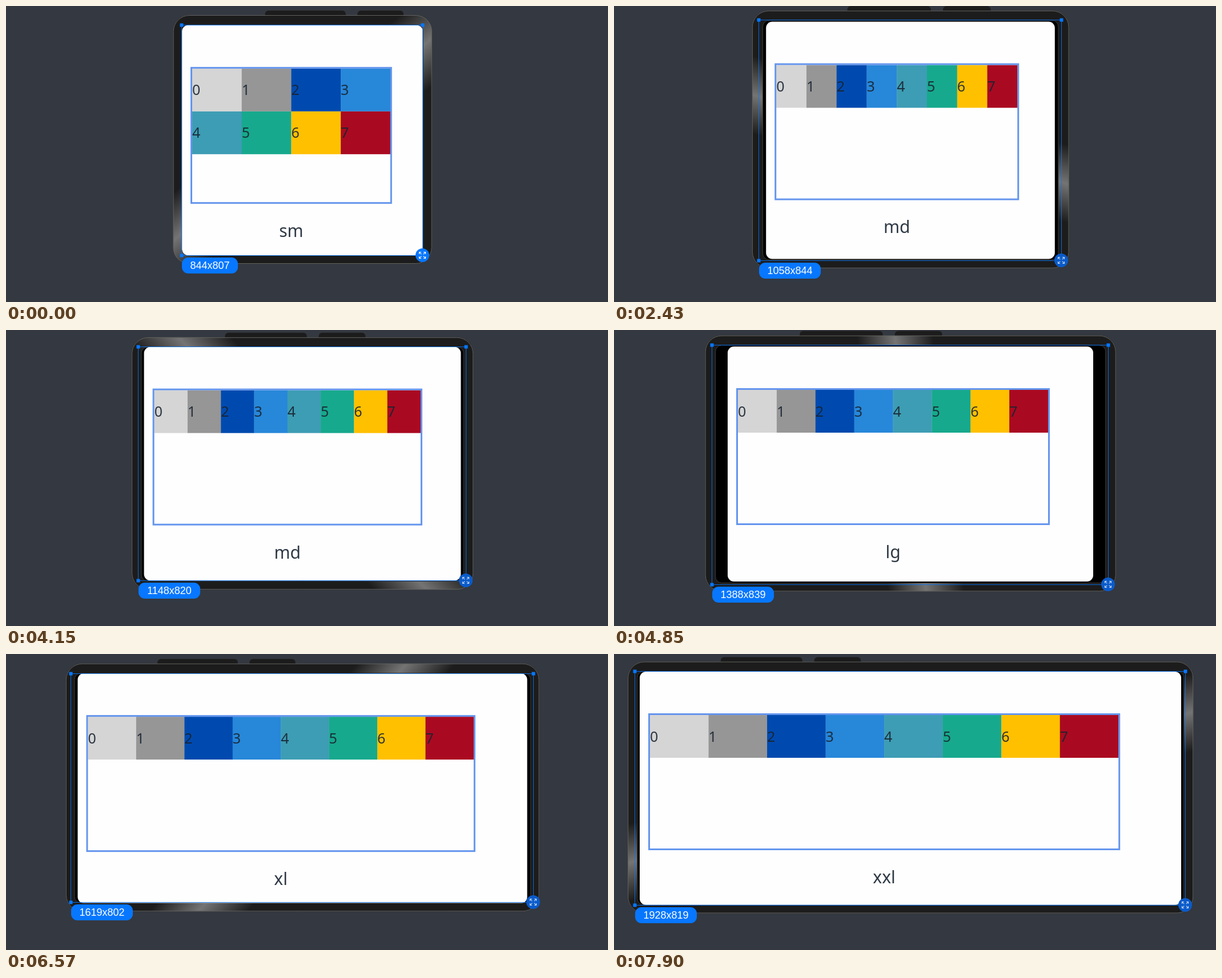
An HTML page with a canvas for the animation above (8000 ms loop, 1054 px wide and 519 px high).

```html
<!DOCTYPE html>
<html lang="en">
<head>
<meta charset="utf-8">
<title>Responsive grid</title>
<style>
html, body { margin: 0; width: 100%; height: 100%; overflow: hidden; background: #343840; }
canvas { display: block; }
</style>
</head>
<body>
<canvas id="stage" width="1054" height="519"></canvas>
<script>
const ctx = document.getElementById('stage').getContext('2d');
const LOOP = 8000, START = 1400, STEP = 101.4, PRESS = 1010;
const BLUE = '#0777ff', BODY = '#1c1c1c';
const CELLS = ['#d5d5d5', '#969696', '#004aaf', '#2787d9', '#3d9db4', '#17a98d', '#ffc000', '#aa0a21'];

// Drag path: step, width, height, vertical centre
const DRAG = [
  [-1, 844, 807, 235.6], [3, 864, 807, 235], [4, 886, 809, 235.6], [5, 900, 815, 236],
  [6, 964, 820, 235.8], [11, 1082, 850, 235], [12, 1087, 853, 234.4], [17, 1087, 853, 234.2],
  [18, 1080, 827, 234], [23, 1080, 827, 234], [24, 1090, 819, 234.4], [31, 1226, 821, 235],
  [32, 1280, 824, 235], [33, 1366, 832, 236], [34, 1388, 839, 236.6], [39, 1440, 836, 236],
  [41, 1456, 834, 235.6], [43, 1468, 807, 235.7], [44, 1494, 803, 235.6], [45, 1512, 807, 235.6],
  [48, 1574, 806, 235.6], [55, 1732, 791, 234.8], [56, 1774, 791, 236], [57, 1808, 803, 237],
  [62, 1896, 818, 235.5], [63, 1914, 817, 235.5], [64, 1928, 819, 235.6]
];
// Glint angle: step, degrees
const GLINT = [[-1, 218], [5, 205], [11, 156], [23, 156], [34, 97], [45, 68], [57, 25], [64, 15]];

function at(keys, s) {
  if (s <= keys[0][0]) return keys[0].slice(1);
  for (let i = 1; i < keys.length; i++) {
    const a = keys[i - 1], b = keys[i];
    if (s <= b[0]) {
      const f = (s - a[0]) / (b[0] - a[0]);
      return a.slice(1).map((v, j) => v + (b[j + 1] - v) * f);
    }
  }
  return keys[keys.length - 1].slice(1);
}

function area(s) {
  const [W, H, cy] = at(DRAG, s);
  return { W, H, x: 519 - W / 4, y: cy - H / 4, w: W / 2, h: H / 2 };
}

function round(x, y, w, h, r) {
  ctx.beginPath();
  ctx.roundRect(x, y, w, h, r);
}

function fillRound(color, ...box) {
  ctx.fillStyle = color;
  round(...box);
  ctx.fill();
}

function text(str, x, y, font, color, align = 'left') {
  ctx.font = font;
  ctx.fillStyle = color;
  ctx.textAlign = align;
  ctx.fillText(str, x, y);
}

function drawFrame(box, deg) {
  const m = 31 + (box.H - 807) * 0.2;
  const w = box.w + m, h = box.h + 32.5;
  const cx = 519.2, cy = 234, x = cx - w / 2, y = cy - h / 2;

  const bx = x + h * 0.369;
  fillRound(BODY, bx, y - 8, h * 0.324, 10, [6, 6, 0, 0]);
  fillRound(BODY, bx + h * 0.371, y - 8, h * 0.185, 10, [6, 6, 0, 0]);

  const a = deg * Math.PI / 180, nx = Math.sin(a) * 66, ny = Math.cos(a) * 66;
  const metal = ctx.createLinearGradient(cx - nx, cy - ny, cx + nx, cy + ny);
  metal.addColorStop(0, BODY);
  metal.addColorStop(0.5, '#747474');
  metal.addColorStop(1, BODY);
  fillRound(metal, x, y, w, h, 28);
  ctx.lineWidth = 1;
  ctx.strokeStyle = '#62625f';
  round(x + 0.5, y + 0.5, w - 1, h - 1, 28);
  ctx.stroke();

  const panel = [x + m / 2, y + 17, w - m, h - 31.8, 11];
  fillRound('#000', ...panel);
  ctx.strokeStyle = '#3a3a3a';
  ctx.stroke();
  return panel;
}

function drawScreen(box, panel) {
  ctx.save();
  round(...panel);
  ctx.clip();
  fillRound('#fefefe', box.x, box.y, box.w, box.h, 11);

  const gx = box.x + 15, gy = box.y + 73, gw = (box.w - 30) * 0.9;
  const cols = box.w < 450 ? 4 : 8, cw = (gw - 6) / cols;
  CELLS.forEach((color, i) => {
    const x = gx + 3 + (i % cols) * cw, y = gy + 3 + Math.floor(i / cols) * 75;
    ctx.fillStyle = color;
    ctx.fillRect(x, y, cw + 0.3, 75);
    text(i, x, y + 46.5, '25px "Noto Sans", sans-serif', 'rgba(24,36,49,.9)');
  });
  ctx.strokeStyle = '#6495ed';
  ctx.lineWidth = 3;
  ctx.strokeRect(gx + 1.5, gy + 1.5, gw - 3, 237);

  const size = ['sm', 'md', 'lg', 'xl', 'xxl'][[450, 600, 750, 900].filter(v => box.w >= v).length];
  text(size, gx + gw / 2, gy + 298, '30px "Noto Sans", sans-serif', 'rgba(24,36,49,.9)', 'center');
  ctx.restore();
}

function drawGrip(x, y, pressed) {
  ctx.fillStyle = pressed ? '#0a5bcb' : BLUE;
  ctx.beginPath();
  ctx.arc(x, y, 12, 0, 7);
  ctx.fill();
  ctx.strokeStyle = pressed ? '#c4d6ee' : '#fff';
  ctx.lineWidth = 1.1;
  ctx.beginPath();
  for (const i of [-1, 1]) for (const j of [-1, 1]) {
    ctx.moveTo(x + 2 * i, y + 5.5 * j);
    ctx.lineTo(x + 5.5 * i, y + 5.5 * j);
    ctx.lineTo(x + 5.5 * i, y + 2 * j);
    ctx.moveTo(x + 5.5 * i, y + 5.5 * j);
    ctx.lineTo(x + 1.7 * i, y + 1.7 * j);
  }
  ctx.stroke();
}

function drawSelection(box, pressed) {
  const x = Math.floor(box.x - 0.5) + 0.5, y = Math.floor(box.y) + 0.5;
  const r = Math.floor(box.x + box.w - 0.2) + 0.5, b = Math.floor(box.y + box.h) + 0.5;
  ctx.strokeStyle = 'rgba(7,119,255,.85)';
  ctx.lineWidth = 1;
  ctx.strokeRect(x, y, r - x, b - y);
  ctx.fillStyle = BLUE;
  for (const [hx, hy] of [[x, y], [r, y], [x, b]]) ctx.fillRect(hx - 3, hy - 3, 6, 6);

  const label = Math.round(box.W) + 'x' + Math.round(box.H);
  const pw = label.length > 7 ? 108 : 98;
  fillRound(BLUE, x + 0.5, b + 3.5, pw, 28, 11);
  text(label, x + 0.5 + pw / 2, b + 23.5, '18px "Liberation Sans", Arial, sans-serif', '#fff', 'center');
  drawGrip(r - 0.5, b - 0.5, pressed);
}

function draw(now) {
  const t = now % LOOP;
  const s = Math.max(-1, Math.floor((t - START) / STEP));
  ctx.fillStyle = '#343840';
  ctx.fillRect(0, 0, 1054, 519);
  // The frame trails the drag by one step, the screen by two.
  const panel = drawFrame(area(s - 1), at(GLINT, s)[0]);
  drawScreen(area(s - 2), panel);
  drawSelection(area(s), t >= PRESS);
}

const t0 = performance.now();
function tick() {
  draw(performance.now() - t0);
  requestAnimationFrame(tick);
}
tick();
</script>
</body>
</html>
```
